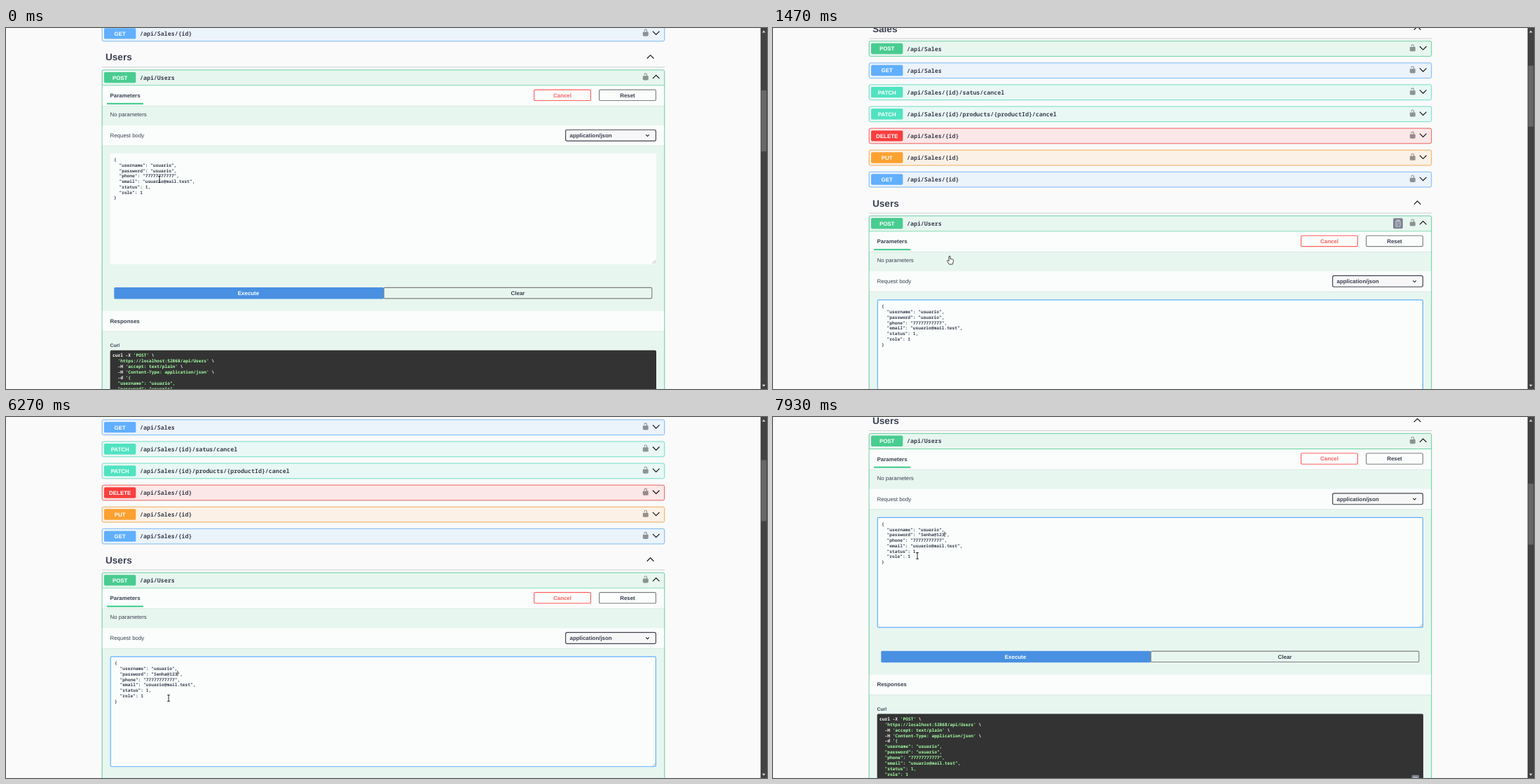
Animation of 1086 by 515 pixels, one loop 8000 ms. Source, as an HTML page:

```html
<!DOCTYPE html>
<html lang="en">
<head>
<meta charset="utf-8">
<title>API explorer</title>
<style>
html, body { margin: 0; width: 100%; height: 100%; overflow: hidden; background: #fafafa; }
svg { display: block; width: 1086px; height: 515px; }
text { font: 7.92px "Liberation Sans", Arial, sans-serif; fill: #3b4151; white-space: pre; text-rendering: geometricPrecision; }
.bold { font-weight: 700; }
.mid { text-anchor: middle; }
.title { font-size: 13.57px; font-weight: 700; }
.path, .code { font-family: "Noto Sans Mono", "DejaVu Sans Mono", monospace; font-weight: 700; }
.path { font-size: 8.29px; }
.code { font-size: 6.217px; font-weight: 600; }
.curl { font-weight: 700; fill: #fff; }
.curl .str { fill: #a2fca2; }
</style>
</head>
<body>
<svg id="stage" viewBox="0 0 1086 515" xmlns="http://www.w3.org/2000/svg"></svg>
<script>
const LOOP = 8000;
const CHAR = 3.73;       // code character width
const LINE = 7.74;       // code line height
const USER = 'usuario';
const MAIL = USER + '@mail.test';
const PHONE = '77777777777';
const COLORS = { POST: '#49cc90', GET: '#61affe', PATCH: '#50e3c2', DELETE: '#f93e3e', PUT: '#fca130' };

const stage = document.getElementById('stage');

function add(parent, tag, attrs = {}, content) {
  const el = document.createElementNS('http://www.w3.org/2000/svg', tag);
  for (const key in attrs) el.setAttribute(key, attrs[key]);
  if (content !== undefined) el.textContent = content;
  parent.appendChild(el);
  return el;
}
const rect = (parent, x, y, width, height, fill, more = {}) =>
  add(parent, 'rect', { x, y, width, height, fill, ...more });
const path = (parent, d, stroke, width = 1, more = {}) =>
  add(parent, 'path', { d, stroke, fill: 'none', 'stroke-width': width, ...more });
const label = (parent, x, y, content, cls = '', more = {}) =>
  add(parent, 'text', { x, y, class: cls, ...more }, content);
const show = (el, visible) => el.setAttribute('visibility', visible ? 'visible' : 'hidden');
const move = (el, x, y) => el.setAttribute('transform', `translate(${x} ${y})`);

const LOCK = 'M15.8 8H14V5.6C14 2.7 12.7 1 10 1S6 2.7 6 5.6V6h2v-.8C8 3.8 8.8 3 10 3s2 .8 2 2.2V8H4' +
  'c-.6 0-1 .6-1 1.2V17c0 .5.4 1.1 1 1.3l1.2.4C5.7 18.9 6.6 19 7.1 19h5.8c.5 0 1.4-.1 2-.3l1.2-.4' +
  'c.5-.2.9-.8.9-1.3V9.2C17 8.6 16.4 8 15.8 8z';

function chevron(parent, x, y, up) {
  const s = up ? -1 : 1;
  path(parent, `M${x - 4.8} ${y - 2.4 * s}L${x} ${y + 2.4 * s}L${x + 4.8} ${y - 2.4 * s}`, '#111', 1.15);
}

function heading(parent, y, name) {
  label(parent, 142, y + 4.9, name, 'title');
  chevron(parent, 919.6, y - .4, true);
  rect(parent, 137, y + 14, 803, .8, '#3b4151', { opacity: .3 });
}

function summary(parent, y, method, url, open) {
  rect(parent, 140, y - 7.8, 45.3, 15.4, COLORS[method], { rx: 1.7 });
  label(parent, 162.7, y + 2.8, method, 'bold mid', { style: 'fill:#fff' });
  label(parent, 191, y + 3, url, 'path');
  add(parent, 'path', { d: LOCK, opacity: .4, transform: `translate(907.1 ${y - 7}) scale(.565)` });
  chevron(parent, 927.7, y - .9, open);
}

function block(parent, y, height, color) {
  rect(parent, 136.6, y - 11.3, 803.6, height + .9, 'none', { rx: 2.6, stroke: '#000', 'stroke-opacity': .07 });
  rect(parent, 137.2, y - 10.8, 802.4, height, color, { rx: 2.3, 'fill-opacity': .1, stroke: color, 'stroke-width': .75 });
}

function button(parent, x, y, width, name, stroke, fill = 'none', color = '#3b4151') {
  rect(parent, x + .6, y + .6, width - 1.2, 15.4, fill, { rx: 1.6, stroke, 'stroke-width': 1.15 });
  label(parent, x + width / 2, y + 11.1, name, 'bold mid', { style: `fill:${color}` });
}

function sectionHeader(parent, y) {
  rect(parent, 137.7, y + 28.5, 801.4, 1, '#000', { opacity: .06 });
  rect(parent, 137.7, y, 801.4, 28.5, '#fff', { opacity: .8 });
}

const jsonLines = password => ['{',
  `  "username": "${USER}",`,
  `  "password": "${password}",`,
  `  "phone": "${PHONE}",`,
  `  "email": "${MAIL}",`,
  '  "status": 1,',
  '  "role": 1',
  '}'];

// --- page, laid out for scroll offset 0 ---
rect(stage, 0, 0, 1086, 515, '#fafafa');
const page = add(stage, 'g');
rect(page, 0, -400, 1077, 105.4, '#fff');
rect(page, 0, -294.7, 1077, 1, '#000', { opacity: .13 });

heading(page, -269.7, 'Auth');
heading(page, -207.5, 'Sales');
heading(page, 41.5, 'Users');
const sale = '/api/Sales';
const rows = [['POST', sale], ['GET', sale], ['PATCH', sale + '/{id}/satus/cancel'],
  ['PATCH', sale + '/{id}/products/{productId}/cancel'],
  ['DELETE', sale + '/{id}'], ['PUT', sale + '/{id}'], ['GET', sale + '/{id}']];
const closedRow = (y, method, url) => {
  block(page, y, 21.6, COLORS[method]);
  summary(page, y, method, url, false);
};
closedRow(-241, 'POST', '/api/Auth');
rows.forEach(([method, url], i) => closedRow(-178.6 + 31.1 * i, method, url));

block(page, 70.7, 800, COLORS.POST);
summary(page, 70.7, 'POST', '/api/Users', true);
rect(page, 137.5, 81.5, 802, .8, COLORS.POST);

const ring = rect(page, 139.8, 62.9, 742.6, 15.8, 'none', { rx: 2, stroke: '#1b2127', 'stroke-width': 1.4 });
const copy = add(page, 'g');
rect(copy, 885, 63, 13.8, 15.2, '#7d8293', { rx: 2 });
path(copy, 'M889 67.3h6v7.6h-6zM890.5 67v-1.2h3V67M890.4 70h3.2M890.4 72.3h2', '#e8eaee', .8);

sectionHeader(page, 82.3);
label(page, 148.5, 98.9, 'Parameters', 'bold');
rect(page, 144, 106.9, 52, 2.2, COLORS.POST);
button(page, 753, 87.5, 82, 'Cancel', '#ff6060', 'none', '#ff6060');
button(page, 846, 87.5, 82, 'Reset', '#808080');
label(page, 148.5, 126, 'No parameters');

sectionHeader(page, 139);
label(page, 148.5, 156, 'Request body');
rect(page, 798.6, 145.2, 128.8, 15.9, '#f7f7f7', { rx: 2.2, stroke: '#41444e', 'stroke-width': 1.15 });
label(page, 804.5, 156, 'application/json', 'bold');
path(page, 'M913.2 152.2l2.3 2.2l2.3-2.2', '#222', 1.1);

rect(page, 148.6, 179, 779.4, 158, '#fff', { rx: 2, opacity: .8 });
path(page, 'M922.5 336l5-5M925.3 336l2.2-2.2', '#777', .6);
const focusBorder = rect(page, 149.2, 179.7, 778.2, 156.8, 'none', { rx: 1.8, stroke: '#61affe', 'stroke-width': 1.2 });

const editor = add(page, 'g');
const marker = rect(editor, 15 * CHAR, 0, USER.length * CHAR, 7.6, '#2b65cf');
const editorLines = jsonLines(USER).map((line, i) => label(editor, 0, 190.1 + i * LINE, line, 'code'));
const selected = label(editor, 15 * CHAR, 0, USER, 'code', { style: 'fill:#fff' });
const caret = rect(editor, 0, 199.6 - LINE / 8, .7, 7.6, '#000');

rect(page, 154.3, 370, 384.7, 16.6, '#4990e2', { rx: 1.6 });
label(page, 346, 381.1, 'Execute', 'bold mid', { style: 'fill:#fff' });
button(page, 538.6, 369.8, 383.8, 'Clear', '#808080');

sectionHeader(page, 403.8);
label(page, 148.5, 420.6, 'Responses', 'bold');
label(page, 148.5, 455, 'Curl', 'bold', { style: 'font-size:6.79px' });
rect(page, 148.6, 459.8, 779.4, 140, '#333', { rx: 2 });

// Each curl line is a white part, a green part and a white tail.
const curl = [["curl -X ", "'POST'", ' \\'],
  ['  ', "'https://localhost:52868/api/Users'", ' \\'],
  ['  -H ', "'accept: text/plain'", ' \\'],
  ['  -H ', "'Content-Type: application/json'", ' \\'],
  ['  -d ', "'{", ''],
  ...jsonLines(USER).slice(1, -1).map(line => ['', line, '']),
  ['', "}'", '']];
curl.forEach((parts, i) => {
  const line = label(page, 152, 469.1 + 7.92 * i, '', 'code curl');
  parts.forEach((part, k) => add(line, 'tspan', k === 1 ? { class: 'str' } : {}, part));
});
rect(page, 911.5, 547, 10.6, 12, '#7d8293', { rx: 1.6 });
path(page, 'M914.3 550.3h5v6h-5z', '#e8eaee', .7);

// --- scrollbar ---
rect(stage, 1076.8, 0, 9.2, 515, '#424242');
const thumb = rect(stage, 1077.6, 0, 7.6, 87, '#686868');
add(stage, 'path', { d: 'M1079 6.4l2.4-3l2.4 3zM1079 508.8l2.4 3l2.4-3z', fill: '#ddd' });

// --- pointers ---
const beam = add(stage, 'g');
path(beam, 'M-1.8-4.4H1.8M0-4.4V4.4M-1.8 4.4H1.8', '#111', .9);
const arrow = add(stage, 'path', { d: 'M0 0V8.6L2 6.8L3.4 10L4.7 9.4L3.4 6.3H6Z', fill: '#fff', stroke: '#111', 'stroke-width': .7 });
const hand = add(stage, 'path', {
  d: 'M-1 .8Q0-.6 1 .8V4.4L2.6 4.6L4.4 5Q5.6 5.2 5.5 6.6L5 9.6L4.2 12H-.6L-2.4 9.4L-3.6 7.2Q-3 5.8-1.8 6.8L-1 7.6Z',
  fill: '#fff', stroke: '#111', 'stroke-width': .8 });

// --- timing ---
const clamp = v => Math.max(0, Math.min(1, v));
const easeOut = v => 1 - (1 - clamp(v)) ** 3;
const smooth = v => v * v * (3 - 2 * v);

// [start, duration, distance]
const scrolls = [[60, 566, 302.7], [1290, 400, -113.1], [6241, 340, -113.1], [6630, 400, -112.8]];
const scrollAt = t => scrolls.reduce((sum, [start, span, by]) => sum + by * easeOut((t - start) / span), 0);

// [time, x, y]
const track = [[0, 219, 216], [60, 219, 216], [330, 357.5, 277.5], [850, 264.3, 366.5], [1290, 264.3, 366.5],
  [1730, 231, 254], [1930, 232, 402], [2070, 232, 402], [2330, 230, 387], [2470, 230, 387],
  [2640, 256, 395], [2800, 242, 396], [3000, 228, 395], [3470, 228, 395], [3530, 227, 394.5],
  [6230, 227, 394.5], [6440, 277.8, 460.5], [6660, 277.8, 460.5], [7300, 207, 198], [7930, 206, 198], [LOOP, 206, 198]];

function pointerAt(t) {
  const i = Math.max(1, track.findIndex(p => p[0] > t));
  const [t0, x0, y0] = track[i - 1], [t1, x1, y1] = track[i];
  const k = smooth(clamp((t - t0) / (t1 - t0)));
  return [x0 + (x1 - x0) * k, y0 + (y1 - y0) * k];
}

function pointerKind(t) {
  if (t < 120) return beam;
  if (t < 800) return arrow;
  if (t < 1800) return hand;
  if (t < 6360) return beam;
  return t < 6900 ? hand : beam;
}

const edits = [[0, USER], [4070, ''], [4530, 's'], [4600, ''], [4800, 'S'], [5000, 'Se'], [5070, 'Sen'],
  [5270, 'Senh'], [5330, 'Senha'], [5530, 'Senha@'], [5670, 'Senha@1'], [5770, 'Senha@12'], [5870, 'Senha@123']];

function render(t) {
  const dy = scrollAt(t);
  move(page, 0, dy);
  thumb.setAttribute('y', 89 - dy * .1695);

  show(ring, t >= 930 && t < 1330);
  show(copy, t >= 800 && t < 1800);

  const focused = t >= 1330;
  show(focusBorder, focused);
  move(editor, focused ? 155.1 : 154, focused ? 1.1 : 0);

  const [editTime, password] = edits.filter(e => e[0] <= t).pop();
  editorLines[2].textContent = jsonLines(password)[2];
  caret.setAttribute('x', (15 + password.length) * CHAR);
  show(caret, t >= 4070 && (t - editTime) % 1000 < 500);

  const selectedLine = t >= 2470 && t < 2935 ? 1 : t >= 3270 && t < 4070 ? 2 : 0;
  marker.setAttribute('y', 184.1 + selectedLine * LINE);
  selected.setAttribute('y', 190.1 + selectedLine * LINE);
  show(marker, selectedLine);
  show(selected, selectedLine);

  const kind = pointerKind(t);
  for (const pointer of [beam, arrow, hand]) show(pointer, pointer === kind);
  move(kind, ...pointerAt(t));
}

const begin = performance.now();
function tick() {
  render((performance.now() - begin) % LOOP);
  requestAnimationFrame(tick);
}
tick();
</script>
</body>
</html>
```
